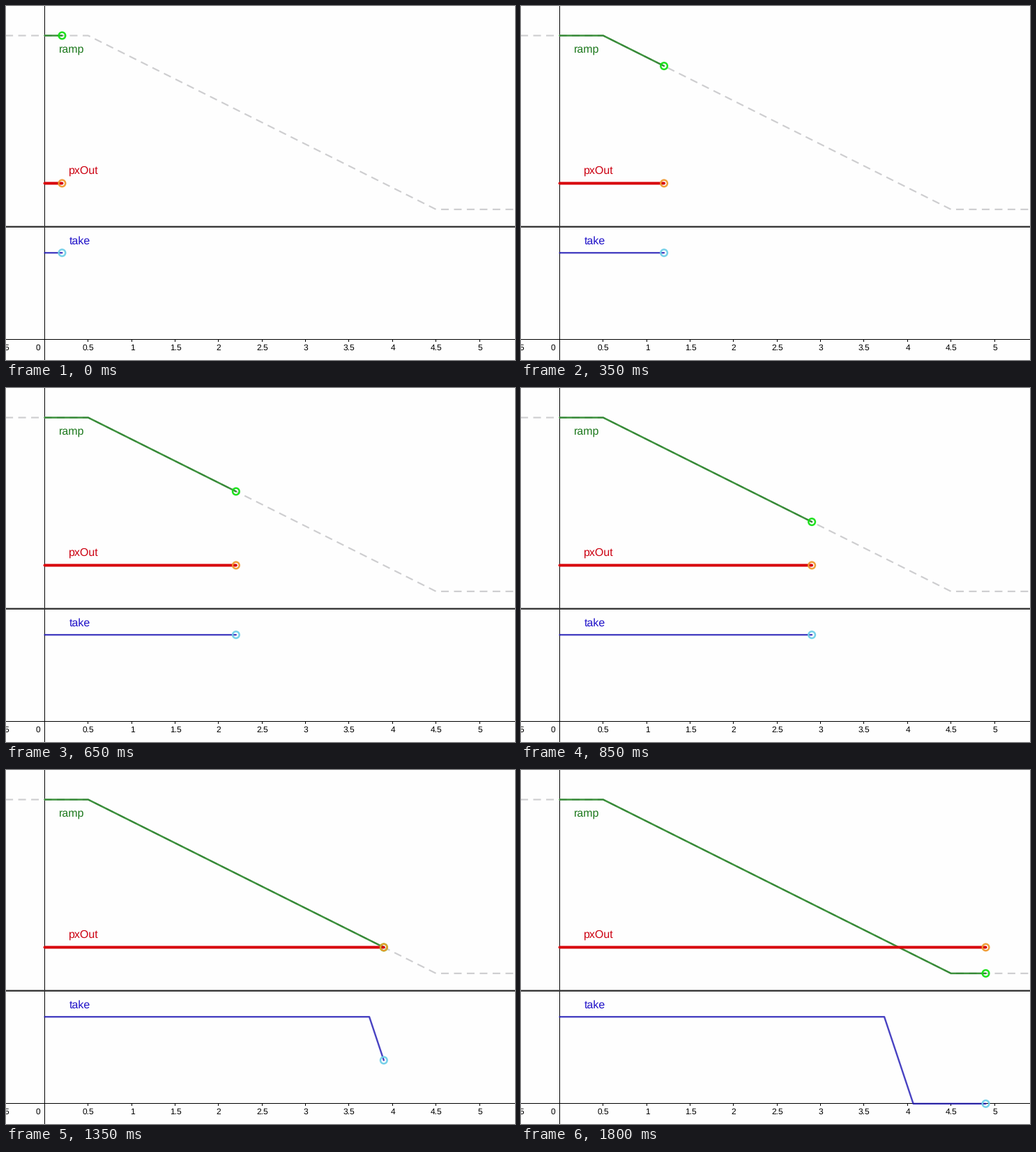
These frames come from a looping animation (730 by 508 pixels, 1850 ms). A matplotlib script:

```python
import matplotlib.pyplot as plt
import numpy as np
from matplotlib.animation import FuncAnimation
from matplotlib.patches import Circle

W, H, FRAMES = 730, 508, 37
X0, Y0, UNIT = 55.5, 478.9, 124.7  # plot origin and pixels per unit

plt.rcParams["font.family"] = "Liberation Sans"
plt.rcParams["text.hinting"] = "none"
plt.rcParams["lines.scale_dashes"] = False

fig = plt.figure(figsize=(W / 72, H / 72), dpi=72, facecolor="#fefefe")
ax = fig.add_axes([0, 0, 1, 1])
ax.set(xlim=(0, W), ylim=(H, 0))
ax.axis("off")


def px(x):
    return X0 + UNIT * np.asarray(x)


def py(y):
    return Y0 - UNIT * np.asarray(y)


def stroke(xs, ys, color, width, **kw):
    kw.setdefault("solid_capstyle", "round")
    line, = ax.plot(xs, ys, color=color, lw=width, snap=False, **kw)
    return line


def number(x, text, ha="center"):
    ax.text(x, 494, text, size=12, ha=ha, va="baseline")


def ramp(t):
    return np.interp(t, [0.5, 4.5], [3.5, 1.5])


def px_out(t):
    return np.full_like(t, 1.8)


def take(t):
    return np.clip(0.5 - 3 * (t - 3.9), 0, 1)


# Corners of the curves; the visible part is cut at the current time
KNOTS = np.array([0, 0.5, 3.9 - 1 / 6, 3.9 + 1 / 6, 4.5])


def head(i):
    t = np.interp(i, [0, 7, 13, 16, 21, 27, 32, 36],
                  [0.2, 1.2, 2.2, 2.8, 3.3, 3.9, 4.5, 4.9])
    return np.floor(t * 10 + 0.5 + 1e-6) / 10


# Axes, ticks and numbers
stroke([0, W], [478.5] * 2, "black", 1, solid_capstyle="butt")
stroke([55.5] * 2, [0, H], "black", 1, solid_capstyle="butt")
for k in range(1, 11):
    col = np.floor(px(k / 2)) + 0.5
    stroke([col] * 2, [478, 482], "black", 1, solid_capstyle="butt")
    number(col + 0.5, f"{k / 2:g}")
number(45.5, "0")
number(5.5, "-0.5", ha="right")

# Fixed curves
stroke([0, W], [py(1.3)] * 2, "#333333", 2.3, solid_capstyle="butt")
stroke([-0.9, px(0.5), px(4.5), W + 20], py([3.5, 3.5, 1.5, 1.5]), "#cdcdcf", 2.1,
       linestyle=(0, (11, 7.48)), dash_capstyle="butt")

# Growing curves with a ring at the tip
curves = []
for z, (fn, color, width, alpha, ring) in enumerate([
        (take, "#1c14b4", 2.4, 0.8, "#70cfe8"),
        (ramp, "#147a14", 2.5, 0.82, "#14e014"),
        (px_out, "#d80008", 4, 1, "#f09a30")]):
    line = stroke([], [], color, width, alpha=alpha, zorder=3 + z)
    tip = Circle((0, 0), 4.8, fill=False, ec=ring, lw=2.5, alpha=0.95,
                 zorder=7 + z, snap=False)
    ax.add_patch(tip)
    curves.append((fn, line, tip))

for x, y, name, color in [(76, 67, "ramp", "#1c781c"),
                          (90, 241, "pxOut", "#cc0010"),
                          (91, 342, "take", "#1e10c8")]:
    ax.text(x, y, name, size=16, color=color, va="baseline", zorder=12)


def update(i):
    now = head(i)
    t = np.append(KNOTS[KNOTS < now], now)
    artists = []
    for fn, line, tip in curves:
        xs, ys = px(t), py(fn(t))
        line.set_data(xs, ys)
        tip.center = xs[-1], ys[-1]
        artists += [line, tip]
    return artists


anim = FuncAnimation(fig, update, frames=FRAMES, interval=50, repeat=True,
                     repeat_delay=0)
plt.show()
```
